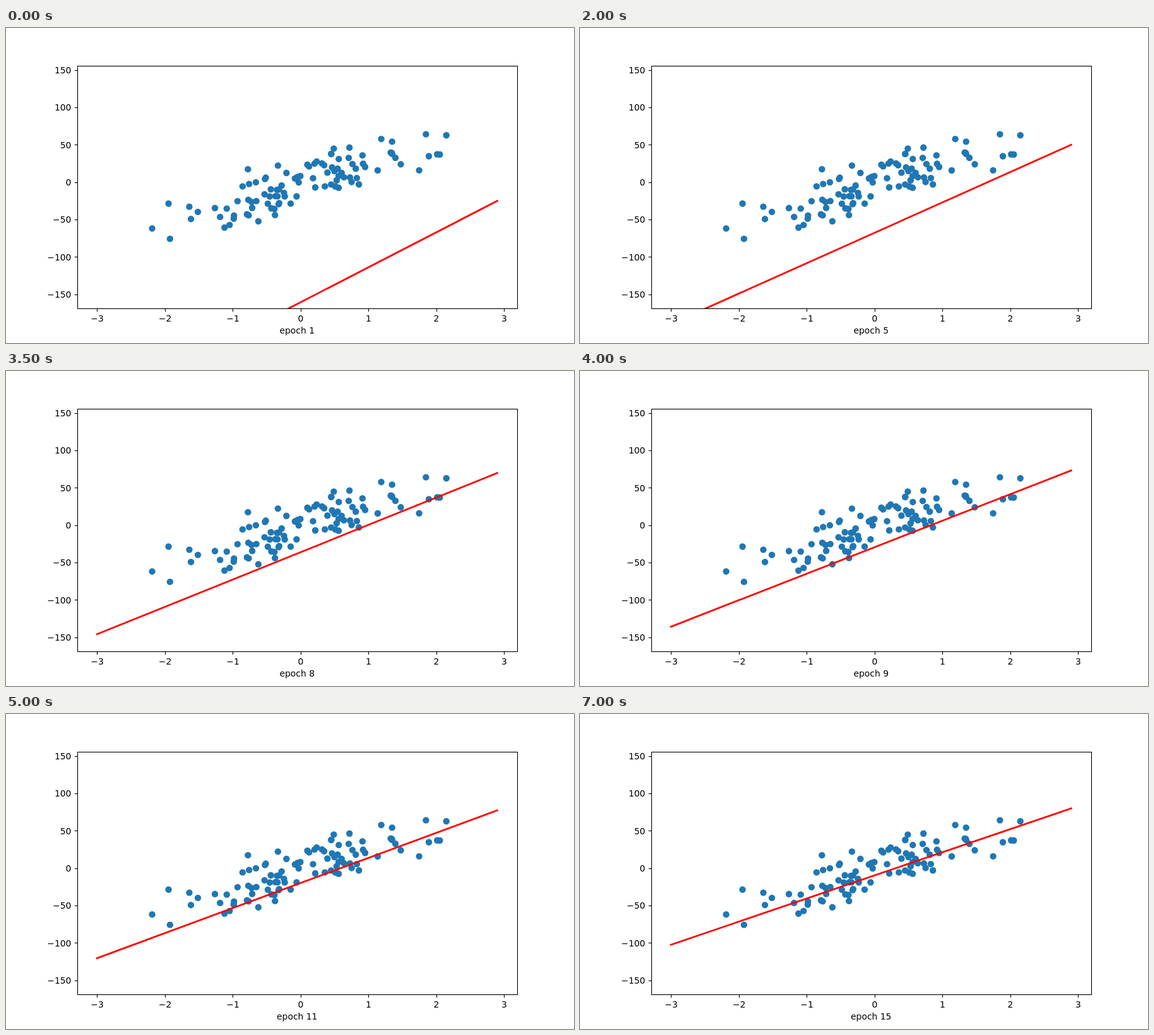
An HTML page for the animation above (7.5 s loop, 900 px wide and 500 px high).

```html
<!DOCTYPE html>
<html lang="en">
<head>
<meta charset="utf-8">
<title>Line fit by gradient descent</title>
<style>
  html, body { margin: 0; width: 100%; height: 100%; overflow: hidden; background: #fff; }
  svg { display: block; }
  text { font: 13.89px "DejaVu Sans", sans-serif; }
</style>
</head>
<body>
<svg id="plot" width="900" height="500" viewBox="0 0 900 500">
  <clipPath id="area"><rect x="112.5" y="60" width="697.5" height="385"/></clipPath>
  <g id="dots" fill="#1f77b4"></g>
  <line id="fit" clip-path="url(#area)" stroke="#f00" stroke-width="2.78" stroke-linecap="square"/>
  <g id="axes" fill="none" stroke="#000" stroke-width="1.11">
    <rect x="113.5" y="60.5" width="697" height="385"/>
  </g>
  <g id="labels"></g>
  <text id="epoch" x="461.25" y="485" text-anchor="middle"></text>
</svg>
<script>
const STEP = 500, EPOCHS = 15, SAMPLES = 100;
const $ = id => document.getElementById(id);
const px = x => 112.5 + (x + 3.295) / 6.49 * 697.5;
const py = y => 60 + (155.75 - y) / 324.5 * 385;
const snap = v => Math.floor(v + 0.5) + 0.5;

function add(parent, tag, attrs, text = "") {
  const el = document.createElementNS("http://www.w3.org/2000/svg", tag);
  for (const key in attrs) el.setAttribute(key, attrs[key]);
  el.textContent = text;
  $(parent).append(el);
}

// Mersenne Twister giving uniform numbers in [0, 1)
function twister(seed) {
  const N = 624, M = 397, state = new Uint32Array(N);
  state[0] = seed;
  for (let i = 1; i < N; i++) {
    const s = state[i - 1] ^ (state[i - 1] >>> 30);
    state[i] = Math.imul(s, 1812433253) + i;
  }
  let at = N;
  function refill() {
    for (let i = 0; i < N; i++) {
      const y = (state[i] & 0x80000000) | (state[(i + 1) % N] & 0x7fffffff);
      state[i] = state[(i + M) % N] ^ (y >>> 1) ^ (y & 1 ? 0x9908b0df : 0);
    }
    at = 0;
  }
  function next() {
    if (at === N) refill();
    let y = state[at++];
    y ^= y >>> 11;
    y ^= (y << 7) & 0x9d2c5680;
    y ^= (y << 15) & 0xefc60000;
    return (y ^ (y >>> 18)) >>> 0;
  }
  return () => {
    const high = next() >>> 5, low = next() >>> 6;
    return (high * 67108864 + low) / 9007199254740992;
  };
}

// Normal numbers by the polar method, made in pairs
function normals(random, count) {
  const out = [];
  while (out.length < count) {
    const a = 2 * random() - 1, b = 2 * random() - 1, r = a * a + b * b;
    if (r >= 1 || r === 0) continue;
    const f = Math.sqrt(-2 * Math.log(r) / r);
    out.push(f * b, f * a);
  }
  return out;
}

// Noisy samples around a random slope
const random = twister(13);
const xs = normals(random, SAMPLES);
const slope = 100 * random();
const ys = normals(random, SAMPLES).map((e, i) => slope * xs[i] + 20 * e);
xs.forEach((x, i) => add("dots", "circle", { cx: px(x), cy: py(ys[i]), r: 5.2 }));

const label = v => String(v).replace("-", "\u2212");
for (let v = -3; v <= 3; v++) {
  add("axes", "path", { d: `M${snap(px(v))} 445.5v4.86` });
  add("labels", "text", { x: px(v) + 0.4, y: 466, "text-anchor": "middle" }, label(v));
}
for (let v = -150; v <= 150; v += 50) {
  add("axes", "path", { d: `M113.5 ${snap(py(v))}h-4.86` });
  add("labels", "text", { x: 103.4, y: Math.round(py(v) + 5.3), "text-anchor": "end" }, label(v));
}

// Gradient descent on the squared error of the line w * x + b
const lines = [];
for (let n = 0, w = 48, b = -200; n < EPOCHS; n++) {
  let dw = 0, db = 0;
  xs.forEach((x, i) => {
    const error = ys[i] - w * x - b;
    dw += 2 * error * x;
    db += 2 * error;
  });
  w += 0.001 * dw;
  b += 0.001 * db;
  lines.push({ w, b });
}

let shown = -1;
function draw() {
  const n = Math.floor(performance.now() / STEP) % EPOCHS;
  if (n !== shown) {
    const { w, b } = lines[n];
    [-3, 2.9].forEach((x, i) => {
      $("fit").setAttribute("x" + (i + 1), px(x));
      $("fit").setAttribute("y" + (i + 1), py(w * x + b));
    });
    $("epoch").textContent = "epoch " + (n + 1);
    shown = n;
  }
  requestAnimationFrame(draw);
}
draw();
</script>
</body>
</html>
```
